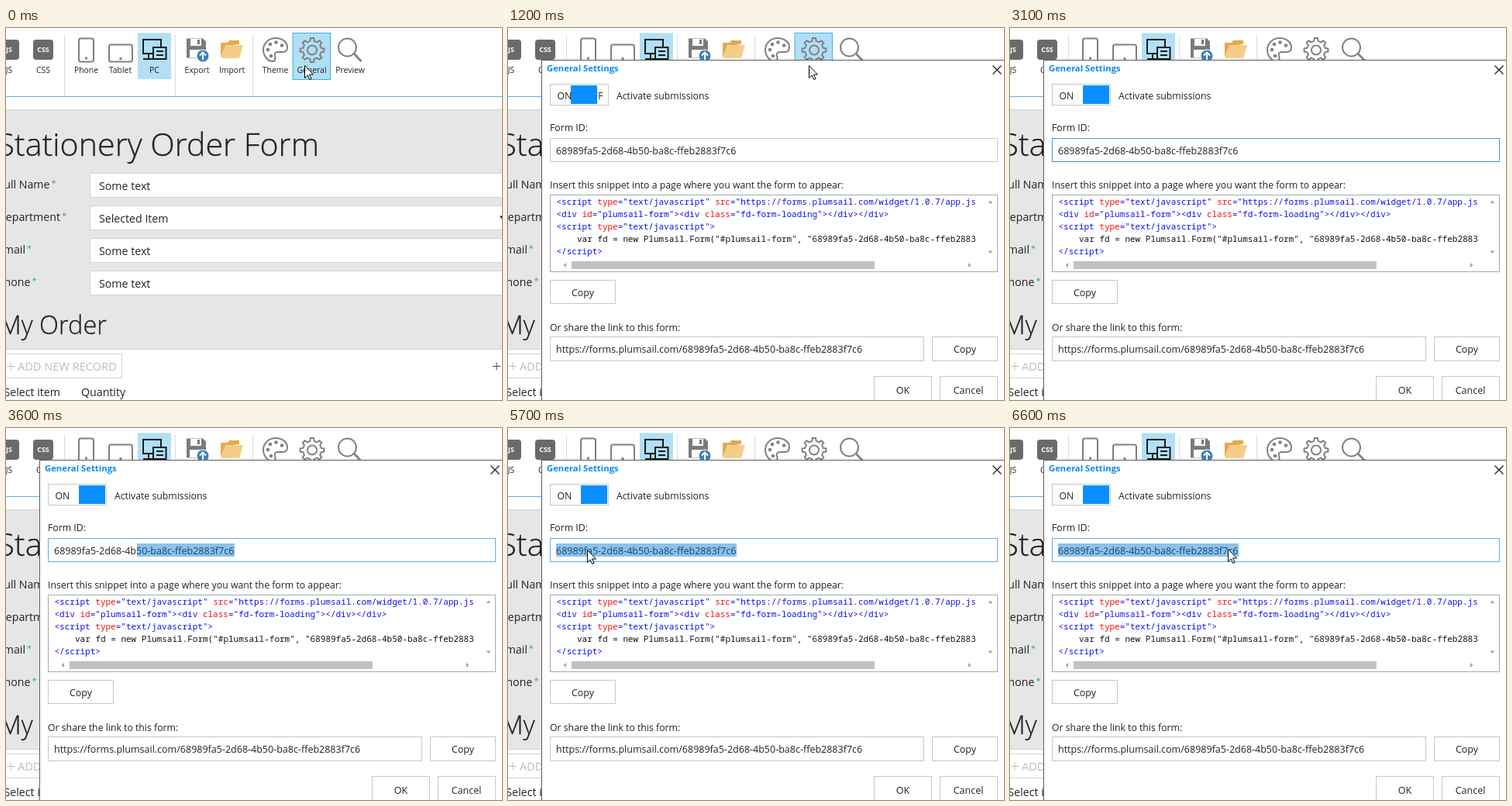
An HTML page that plays this animation: 640x480 px, repeating every 6700 ms.

```html
<!DOCTYPE html>
<html lang="en">
<head>
<meta charset="utf-8">
<title>Form settings</title>
<style>
  html, body { margin: 0; height: 100%; overflow: hidden; background: #fff; }
  svg { display: block; width: 100vw; height: 100vh; }
  text { font-family: "Open Sans", "Noto Sans", sans-serif; fill: #222; white-space: pre; }
  .title { font-weight: 300; text-anchor: end; stroke: #222; stroke-width: .3; }
  .form text { font-size: 14.2px; }
  .form .title { font-size: 41.2px; }
  .form .sub { font-size: 32.6px; }
  .form .field { stroke: #d2d2d2; }
  .label { text-anchor: end; }
  .form .star { font-size: 11px; fill: #2f9bd8; }
  .tools text { font-size: 10.4px; text-anchor: middle; }
  .tools .badge { font-size: 9px; font-weight: 700; fill: #fff; }
  .icon { fill: none; stroke: #808080; stroke-width: 2; }
  .field { fill: #fff; stroke: #c8c8c8; }
  .dialog text { font-size: 12.28px; }
  .dialog .value { font-size: 12.5px; }
  .dialog .mid { text-anchor: middle; font-size: 12.5px; }
  .dialog .head { font-size: 11.3px; font-weight: 700; fill: #0a8cf0; }
  .code text { font: 11px "Noto Sans Mono", "DejaVu Sans Mono", monospace; fill: #1010e8; }
  .code .js { fill: #111; }
  .attr { fill: #f01010; }
</style>
</head>
<body>
<svg viewBox="0 0 640 480">
  <rect width="640" height="480" fill="#fff"/>

  <g class="tools">
    <path d="M75.5 9V88M218.5 9V88M318.5 9V88" stroke="#dcdcdc"/>
    <path d="M0 88.5H640" stroke="#4fb9dc"/>
    <rect x="170" y="6.5" width="43" height="59.5" fill="#b1dff5"/>
    <rect id="hover" x="370" y="6.5" width="48.5" height="60" fill="#b1dff5" stroke="#3fb2e2"/>

    <rect x="-9" y="15" width="26" height="26" rx="4" fill="#6a6a6a"/>
    <rect x="35" y="15" width="26" height="26" rx="4" fill="#6a6a6a"/>
    <text class="badge" x="4" y="31">JS</text>
    <text class="badge" x="48" y="31">CSS</text>

    <g class="icon">
      <rect x="94" y="13.5" width="19" height="30" rx="2.5"/>
      <rect x="133" y="21.5" width="30" height="22" rx="2.5"/>
      <path d="M348 13c-9 0-16 7-16 15 0 8 6 15 12 15 4 0 4-4 3-7-1-4 1-5 5-5h5c4 0 6-2 6-6 0-7-7-12-15-12z"/>
      <path id="gear"/>
      <circle cx="395" cy="28.5" r="6"/>
      <circle cx="440.5" cy="25" r="11.5"/>
      <path d="M449 33L458.5 43" stroke-width="2.6"/>
    </g>
    <g fill="#808080">
      <circle cx="103.5" cy="39" r="1.7"/>
      <circle cx="148" cy="39.5" r="1.7"/>
      <circle cx="338" cy="28" r="2.3"/>
      <circle cx="341" cy="21" r="2.3"/>
      <circle cx="348.5" cy="18.5" r="2.3"/>
      <circle cx="356" cy="22.5" r="2.3"/>
      <circle cx="342" cy="36" r="2.3"/>
    </g>

    <path d="M189 33H177V15H200V25M184 33V40M177 40H189M190 25H206.5V40H190ZM194 30H203M194 35H203" fill="none" stroke="#1b1b1b" stroke-width="2"/>

    <path d="M233 13.5H254L258 17.5V38.5H233Z" fill="#7b7b7b"/>
    <path d="M238 14H252V23H238ZM237 28H254V38H237Z" fill="#fff"/>
    <rect x="247" y="15" width="3" height="6" fill="#7b7b7b"/>
    <circle cx="254" cy="36" r="8" fill="#3d7fc0" stroke="#fff"/>
    <path d="M254 41V32M250 35.5L254 31.5L258 35.5" fill="none" stroke="#fff" stroke-width="2"/>

    <path d="M277 38V19H286L288 16H301V21L283 23Z" fill="#e3a954"/>
    <path d="M277 39L283 22H306L301 39Z" fill="#f6cd87"/>

    <text x="4" y="58">JS</text>
    <text x="48" y="58">CSS</text>
    <text x="103.5" y="58">Phone</text>
    <text x="147.5" y="58">Tablet</text>
    <text x="191.5" y="58">PC</text>
    <text x="246.5" y="58">Export</text>
    <text x="291.5" y="58">Import</text>
    <text x="347.5" y="58">Theme</text>
    <text x="394.5" y="58">General</text>
    <text x="444" y="58">Preview</text>
  </g>

  <g class="form">
    <rect y="105" width="640" height="309" fill="#e6e6e6"/>
    <path d="M0 105.5H640M0 414.5H640" stroke="#d2d2d2"/>
    <text class="title" x="404" y="164.5">Stationery Order Form</text>
    <g id="rows"></g>
    <path d="M637 242.5H645L641 248Z" fill="#111"/>
    <text class="title sub" x="130" y="394.5">My Order</text>
    <rect class="field" x="-8.5" y="420.5" width="158" height="31"/>
    <path d="M1 436.5H11M6 431.5V441.5" stroke="#bdbdbd"/>
    <text x="15" y="442" style="font-size:14.6px;fill:#bdbdbd">ADD NEW RECORD</text>
    <path d="M628 436.5H638M633 431.5V441.5" stroke="#444"/>
    <text class="label" x="70" y="475">Select item</text>
    <text x="97" y="475">Quantity</text>
  </g>

  <g class="dialog" id="dialog">
    <rect x="43.5" y="41.5" width="610" height="450" fill="#fff" stroke="#5c5c5c"/>
    <text class="head" x="50" y="56">General Settings</text>
    <path d="M625.5 48.5L636.5 59.5M636.5 48.5L625.5 59.5" stroke="#222" stroke-width="1.4"/>

    <rect class="field" x="54.5" y="72.5" width="75" height="27"/>
    <text x="63.5" y="91.5">ON</text>
    <text id="off" x="122.5" y="91.5" text-anchor="end">OFF</text>
    <rect id="knob" y="74" width="34" height="24" fill="#0a8fff"/>
    <text x="140" y="91.5">Activate submissions</text>

    <text x="54" y="133">Form ID:</text>
    <rect class="field" id="idBox" x="54.5" y="142.5" width="577" height="30"/>
    <text class="value" x="62" y="162.5">68989fa5-2d68-4b50-ba8c-ffeb2883f7c6</text>
    <rect id="pick" y="149" height="17" fill="#0078d0" fill-opacity=".45"/>

    <text x="54" y="207">Insert this snippet into a page where you want the form to appear:</text>
    <rect x="54.5" y="215.5" width="577" height="99" fill="#fff" stroke="#a8a8a8"/>
    <g class="code">
      <text x="62.5" y="228">&lt;script <tspan class="attr">type</tspan>="text/javascript" <tspan class="attr">src</tspan>="https://forms.plumsail.com/widget/1.0.7/app.js</text>
      <text x="62.5" y="244">&lt;div <tspan class="attr">id</tspan>="plumsail-form"&gt;&lt;div <tspan class="attr">class</tspan>="fd-form-loading"&gt;&lt;/div&gt;&lt;/div&gt;</text>
      <text x="62.5" y="260">&lt;script <tspan class="attr">type</tspan>="text/javascript"&gt;</text>
      <text class="js" x="89" y="276">var fd = new Plumsail.Form("#plumsail-form", "68989fa5-2d68-4b50-ba8c-ffeb2883</text>
      <text x="62.5" y="292">&lt;/script&gt;</text>
    </g>
    <rect x="82" y="301" width="391" height="10" fill="#c1c1c1"/>
    <path d="M75 303V309L71.5 306ZM594 303V309L597.5 306ZM619.5 226H625.5L622.5 222.5ZM619.5 287.5H625.5L622.5 291Z" fill="#a3a3a3"/>

    <rect class="field" x="54.5" y="325.5" width="84" height="30"/>
    <text class="mid" x="96.5" y="346">Copy</text>
    <text x="54" y="390.5">Or share the link to this form:</text>
    <rect class="field" x="54.5" y="398.5" width="482" height="31"/>
    <text class="value" x="62" y="419">https://forms.plumsail.com/68989fa5-2d68-4b50-ba8c-ffeb2883f7c6</text>
    <rect class="field" x="547.5" y="398.5" width="84" height="31"/>
    <text class="mid" x="589.5" y="419">Copy</text>
    <rect class="field" x="472.5" y="449.5" width="74" height="36"/>
    <text class="mid" x="509.5" y="471.5">OK</text>
    <rect class="field" x="557.5" y="449.5" width="74" height="36"/>
    <text class="mid" x="594" y="471.5">Cancel</text>
  </g>

  <path id="cursor" d="M.5 .5V16.5L4.2 13L6.7 18.5L9 17.5L6.5 12H11.5Z" fill="#fff" stroke="#000"/>
</svg>
<script>
const $ = id => document.getElementById(id);
const set = (id, name, value) => $(id).setAttribute(name, value);
const show = (id, on) => { $(id).style.display = on ? '' : 'none'; };

const rows = [
  ['Full Name', 56.5, 'Some text', 187.5],
  ['Department', 70, 'Selected Item', 229.5],
  ['Email', 25, 'Some text', 271.5],
  ['Phone', 31.5, 'Some text', 313.5]
];
$('rows').innerHTML = rows.map(([label, end, value, y]) => `
  <text class="label" x="${end}" y="${y + 19}">${label}</text>
  <text class="star" x="${end + 2}" y="${y + 16}">*</text>
  <rect class="field" x="108.5" y="${y}" width="560" height="31"/>
  <text x="120" y="${y + 21}">${value}</text>`).join('');

// Eight teeth, four corners each
const gear = [];
for (let tooth = 0; tooth < 8; tooth++) {
  for (const [turn, r] of [[-.28, 12], [-.17, 15.5], [.17, 15.5], [.28, 12]]) {
    const a = (tooth + turn) * Math.PI / 4;
    gear.push(`${(395 + r * Math.cos(a)).toFixed(1)} ${(28.5 + r * Math.sin(a)).toFixed(1)}`);
  }
}
set('gear', 'd', `M${gear.join('L')}Z`);

// Keys: [time, ...values]
const path = [
  [0, 385, 48], [100, 388, 48], [1800, 388, 48], [1900, 374, 66], [2000, 342, 104], [2100, 315, 134],
  [4100, 60, 155], [5600, 60, 155], [5700, 102, 157], [5900, 145, 160], [6300, 247, 152],
  [6400, 262, 152], [6600, 281, 156]
];
const pickLeft = [[3100, 295], [3600, 169], [3700, 169], [4000, 69], [4100, 62]];

function at(keys, t) {
  const i = keys.findIndex(k => k[0] > t);
  if (i < 0) return keys[keys.length - 1].slice(1);
  if (i === 0) return keys[0].slice(1);
  const a = keys[i - 1], b = keys[i], p = (t - a[0]) / (b[0] - a[0]);
  return a.slice(1).map((v, n) => Math.round(v + (b[n + 1] - v) * p));
}

function border(t) {
  if (t < 2200) return '#c8c8c8';
  if (t < 3100) return '#8fc4ee';
  return t < 3600 ? '#4096de' : '#66aae0';
}

function draw() {
  const t = Math.floor(performance.now() % 6700 / 100) * 100;
  show('dialog', t >= 1200);
  show('hover', t < 1300);
  show('off', t < 1300);
  set('knob', 'x', t < 1300 ? 81 : 94);
  $('idBox').style.stroke = border(t);
  const [left] = at(pickLeft, t);
  set('pick', 'x', left);
  set('pick', 'width', 295 - left);
  show('cursor', t < 2200 || t >= 4100);
  set('cursor', 'transform', `translate(${at(path, t)})`);
  requestAnimationFrame(draw);
}
draw();
</script>
</body>
</html>
```
